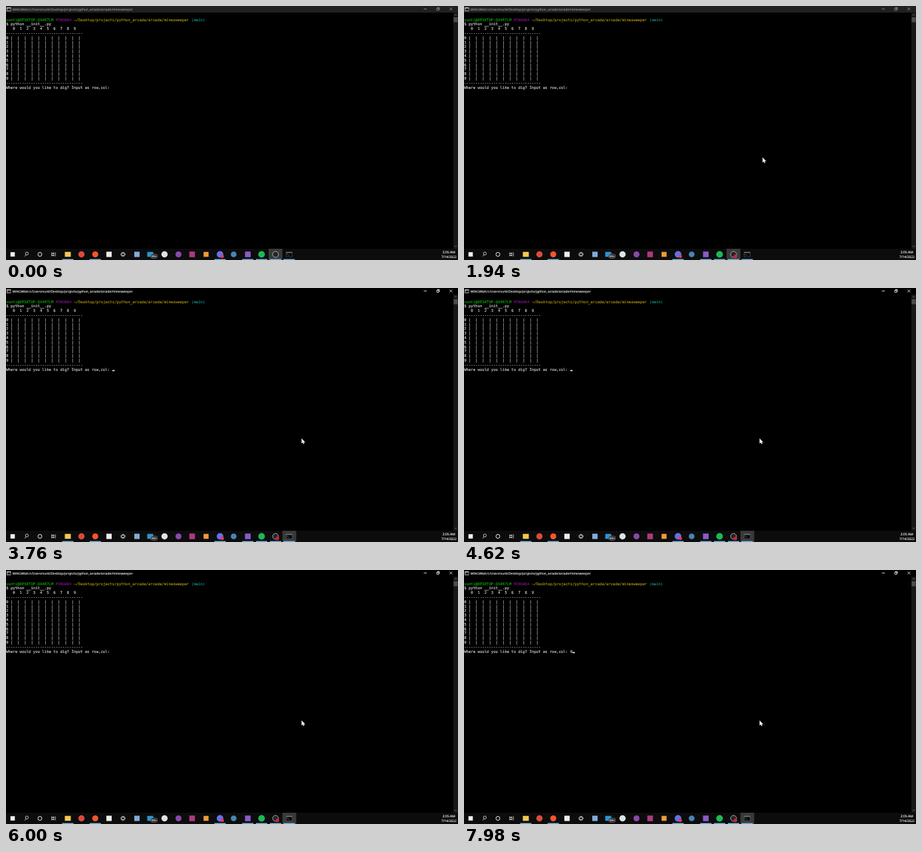
An HTML page that plays this animation: 680 by 383 pixels, repeating every 8 s.

```html
<!DOCTYPE html>
<html lang="en">
<head>
<meta charset="utf-8">
<title>Minesweeper terminal</title>
<style>
html, body { margin: 0; width: 100%; height: 100%; overflow: hidden; background: #000; }
svg { display: block; width: 100%; height: 100%; }
text { white-space: pre; text-rendering: geometricPrecision; }
.mono { font: 5.648px "DejaVu Sans Mono", monospace; stroke-width: 0.14; }
.ui { font: 4.85px "Open Sans", sans-serif; stroke-width: 0.12; }
</style>
</head>
<body>
<svg id="stage" viewBox="0 0 680 383"></svg>
<script>
const NS = 'http://www.w3.org/2000/svg';
const stage = document.getElementById('stage');
const LOOP = 8000, CHAR = 3.4, LINE = 6.8;
const FOCUS = 2860, TASK_SWITCH = 3000, RECORD = 480, TYPED = 7700;
const BLINK = 530, BLINK_START = 3295;

function add(tag, attrs, content) {
  const el = stage.appendChild(document.createElementNS(NS, tag));
  for (const k in attrs) el.setAttribute(k, attrs[k]);
  if (content !== undefined) el.textContent = content;
  return el;
}
const rect = (x, y, width, height, fill) => add('rect', { x, y, width, height, fill });
const circle = (cx, cy, r, fill) => add('circle', { cx, cy, r, fill });
const line = (d, stroke, w = 0.8) => add('path', { d, stroke, fill: 'none', 'stroke-width': w });
const mono = (col, row, str, fill = '#d2d2d2') =>
  add('text', { class: 'mono', x: 0.2 + col * CHAR, y: 22.5 + row * LINE, fill, stroke: fill }, str);

function paint(el, color) {
  el.setAttribute('fill', color);
  el.setAttribute('stroke', color);
}
const show = (el, on) => el.setAttribute('visibility', on ? 'visible' : 'hidden');

// Title bar
rect(0, 0, 680, 383, '#000');
const titleBar = rect(0, 0, 680, 10, '#202020');
rect(1, 2.2, 6.4, 5.6, '#ddd');
rect(1.6, 3.6, 5.2, 3.6, '#080808');
line('M2.2 4.5l1 .8l-1 .8M3.8 6.4h1.6', '#ddd', 0.5);
const title = add('text', { class: 'ui', x: 9.8, y: 6.7 },
  'MINGW64:/c/Users/vunti/Desktop/projects/python_arcade/arcade/minesweeper');
const buttons = line('M628.5 4.6h4.6M648 3.4h3v3h-3zM649 3.4v-1h3v3h-1M667.3 2.5l4 4M671.3 2.5l-4 4', '#999', 0.8);

// Scroll bar
rect(673, 10, 7, 356, '#171717');
rect(673.4, 17, 6.2, 7.5, '#4d4d4d');
line('M675 14.2l1.5 -1.5l1.5 1.5M675 361.6l1.5 1.5l1.5 -1.5', '#888');

// Terminal text
mono(0, 0, 'vunti@DESKTOP-QX4R7LM', '#13a10e');
mono(22, 0, 'MINGW64', '#73157f');
mono(30, 0, '~/Desktop/projects/python_arcade/arcade/minesweeper', '#a89210');
mono(82, 0, '(main)', '#129486');
mono(0, 1, '$ python __init__.py');
const digits = [...'0123456789'];
mono(0, 2, '   ' + digits.join('  '));
mono(0, 3, '-'.repeat(34));
digits.forEach((d, i) => mono(0, 4 + i, d + ' |' + '  |'.repeat(10)));
mono(0, 14, '-'.repeat(34));
mono(0, 15, 'Where would you like to dig? Input as row,col:');
const typed = mono(47, 15, '0');
const caret = rect(47 * CHAR, 123.7, CHAR + 0.2, 1.6, '#f2f2f2');

// Task bar
const MID = 374.5;
rect(0, 366, 680, 17, '#0c0c0c');
const active = rect(395, 366, 20.8, 17, '#393939');
const dot = (x, fill, r = 4.7) => circle(x, MID, r, fill);
const box = (x, fill, w = 8, h = w) => rect(x - w / 2, MID - h / 2, w, h, fill);

box(10, '#f2f2f2', 6.6);
line('M28 377.6l2.3 -2.6M33.6 373.2a2.2 2.2 0 1 1 -4.4 0a2.2 2.2 0 1 1 4.4 0', '#eee');
dot(51, 'none', 3).setAttribute('stroke', '#eee');
line('M68.5 371.5v1h4v-1M68.5 377.5v-1h4v1M68.5 373.5h4v2h-4zM74.5 371.5v6', '#ddd', 0.7);
box(93, '#f3c74f', 9, 7.5);
dot(113.5, '#dd4a39');
dot(134.3, '#fb542b', 4.5);
box(155, '#eee', 8);
dot(176, 'none', 2.2).setAttribute('stroke', '#eee');
const teeth = dot(176, 'none', 3.3);
teeth.setAttribute('stroke', '#eee');
teeth.setAttribute('stroke-dasharray', '1.3 1.29');
box(197, '#83abd8', 8);
box(217, '#2795d4', 9, 7.5);
dot(238.5, '#dde4e3');
dot(259.5, '#8a47ad', 4.5);
box(280, '#ad397f', 8.5);
box(301, '#ec9c3b', 7.5);
dot(322, '#6470ea', 5);
dot(342.5, '#4785b5', 4.3);
box(363.8, '#8b5bc4', 8.5);
dot(384.5, '#1db954', 5);
const recorder = dot(405.5, '#252427', 4.4);
recorder.setAttribute('stroke', '#ccc');
recorder.setAttribute('stroke-width', 0.8);
rect(421.3, 370.8, 9.4, 7.4, '#777');
rect(421.7, 372.4, 8.6, 5.4, '#050505');
line('M422.8 373.6l1 .8l-1 .8M424.6 375.6h1.6', '#bbb', 0.5);

add('rect', { x: 217.5, y: 374, width: 10.5, height: 6.4, rx: 3.2, fill: '#262626', stroke: '#bbb', 'stroke-width': 0.4 });
const label = (x, y, str, size) => add('text', {
  class: 'ui', x, y, fill: '#fff', stroke: '#fff', 'text-anchor': 'middle', style: `font-size:${size}px`
}, str);
label(222.7, 378.8, '99+', 4.3);
circle(325.4, 377.6, 2.5, '#e53b3f');
const recDot = circle(408.3, 377.6, 2.6, '#d9202a');
for (const x of [93, 134.3, 322, 363.8, 384.5, 405.5, 426]) rect(x - 8.5, 381.6, 17, 1.4, '#76b9ed');
label(666.3, 372.5, '2:05 AM', 5);
label(666.3, 380, '7/14/2022', 4.8);

const pointer = add('path', {
  d: 'M0 0V7.2L1.7 5.7L2.8 8.2L3.9 7.7L2.8 5.3H5.1Z', fill: '#fff', stroke: '#fff', 'stroke-width': 0.25
});

// Pointer stops: time, x, y
const stops = [
  [1400, 669, 246], [1720, 453, 230], [1900, 449.3, 228.6],
  [2550, 449.3, 228.6], [2760, 444.8, 227.1], [LOOP, 444.8, 227.1]
];

function pointerAt(t) {
  const i = Math.max(1, stops.findIndex(s => t < s[0]));
  const [t0, x0, y0] = stops[i - 1], [t1, x1, y1] = stops[i];
  const u = Math.max(0, (t - t0) / (t1 - t0)), k = u * (2 - u);
  return [x0 + (x1 - x0) * k, y0 + (y1 - y0) * k];
}

function draw(t) {
  const focused = t >= FOCUS;
  const ink = focused ? '#fff' : '#999';
  titleBar.setAttribute('fill', focused ? '#000' : '#202020');
  paint(title, ink);
  buttons.setAttribute('stroke', ink);
  active.setAttribute('x', t < TASK_SWITCH ? 395 : 415.8);
  show(recDot, t >= RECORD);
  show(typed, t >= TYPED);
  show(caret, t >= BLINK_START && Math.floor((t - BLINK_START) / BLINK) % 2 === 0);
  caret.setAttribute('x', (t < TYPED ? 47 : 48) * CHAR);
  show(pointer, t >= stops[0][0]);
  pointer.setAttribute('transform', `translate(${pointerAt(t)})`);
}

const start = performance.now();
function tick() {
  draw((performance.now() - start) % LOOP);
  requestAnimationFrame(tick);
}
tick();
</script>
</body>
</html>
```
